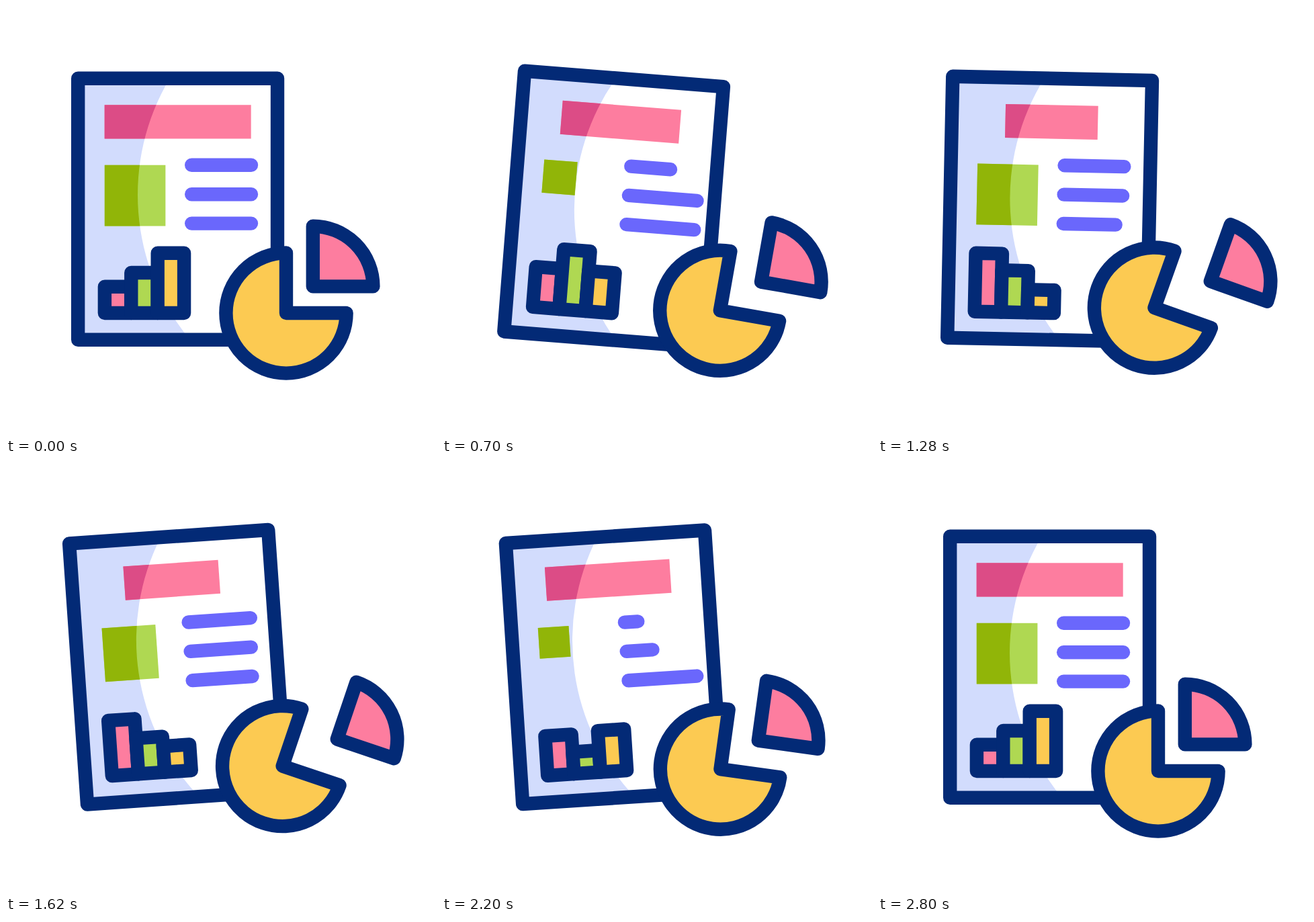
Animation, 640 px wide and 640 px high, one loop 2.82 s. Source, as an HTML page:

```html
<!DOCTYPE html>
<html lang="en">
<head>
<meta charset="utf-8">
<title>Report</title>
<style>
  html, body { margin: 0; width: 100%; height: 100%; overflow: hidden; background: #fff; }
  svg { display: block; width: 100vw; height: 100vh; }
  .ink { stroke: #032a76; stroke-width: 20.4; stroke-linejoin: round; }
  .line { stroke: #6a67fc; stroke-width: 20.4; stroke-linecap: round; }
</style>
</head>
<body>
<svg viewBox="0 0 640 640">
  <defs>
    <clipPath id="shade">
      <path d="M107 108H243.5A338.5 338.5 0 0 0 274 497H107Z"/>
    </clipPath>
  </defs>
  <g id="page">
    <rect x="107.2" y="107.8" width="296.8" height="389" fill="#fff"/>
    <g clip-path="url(#shade)">
      <rect x="107.2" y="107.8" width="296.8" height="389" fill="#d2dcfd"/>
    </g>
    <rect class="header" y="147.3" height="50.2" fill="#fd7d9f"/>
    <rect class="square" x="146.8" y="236.8" fill="#afd852"/>
    <g clip-path="url(#shade)">
      <rect class="header" y="147.3" height="50.2" fill="#dc4c86"/>
      <rect class="square" x="146.8" y="236.8" fill="#91b508"/>
    </g>
    <path class="line"/><path class="line"/><path class="line"/>
    <rect class="ink" x="107.2" y="107.8" width="296.8" height="389" fill="none"/>
    <rect class="ink bar" x="146.9" width="39.4" fill="#fd7d9f"/>
    <rect class="ink bar" x="186.3" width="39.4" fill="#afd852"/>
    <rect class="ink bar" x="225.7" width="39.4" fill="#fcca52"/>
  </g>
  <g id="chart">
    <path class="ink" fill="#fcca52" d="M417 457V367.4A89.6 89.6 0 1 0 506.6 457Z"/>
    <path id="slice" class="ink" fill="#fd7d9f" d="M456.8 417.4V327.8A89.6 89.6 0 0 1 546.4 417.4Z"/>
  </g>
</svg>
<script>
const LOOP = 2820, SPAN = 2800, HALF = SPAN / 2, QUARTER = SPAN / 4;
const all = selector => [...document.querySelectorAll(selector)];
const page = document.getElementById('page');
const chart = document.getElementById('chart');
const slice = document.getElementById('slice');
const headers = all('.header'), squares = all('.square');
const lines = all('.line'), bars = all('.bar');

const smooth = x => x * x * (3 - 2 * x);

// Linear start, eased end: cubic bezier (1/6, 1/6, 2/3, 1).
function settle(x) {
  const curve = (s, a, b) => 3 * a * (1 - s) ** 2 * s + 3 * b * (1 - s) * s * s + s ** 3;
  let low = 0, high = 1;
  for (let i = 0; i < 24; i++) {
    const mid = (low + high) / 2;
    if (curve(mid, 1 / 6, 2 / 3) < x) low = mid; else high = mid;
  }
  return curve(low, 1 / 6, 1);
}
const launch = x => 1 - settle(1 - x);

// Keys are [time, value, easing towards this key].
function track(time, keys) {
  if (time <= keys[0][0]) return keys[0][1];
  for (let i = 1; i < keys.length; i++) {
    const [t0, v0] = keys[i - 1], [t1, v1, ease = smooth] = keys[i];
    if (time < t1) return v0 + (v1 - v0) * ease((time - t0) / (t1 - t0));
  }
  return keys[keys.length - 1][1];
}

const tilt = [[0, 0], [905, 5, settle], [1800, -5], [SPAN, 0, launch]];
const swing = [[0, 0], [HALF, 1], [SPAN, 0]];
const squareSize = [[0, 90.6], [480, 66.5], [560, 66.5], [760, 45], [1270, 90.6]];
const lineLength = [[0, 88.8], [640, 102], [760, 18], [1240, 88.8]];
const barHeights = [
  [39.2, 60, 89.2, 60, 39.2],
  [60, 89.2, 60, 31, 60],
  [89.2, 60, 32, 60, 89.2]
].map(values => values.map((v, i) => [i * QUARTER, v]));

function draw(now) {
  const t = Math.min(now % LOOP, SPAN), u = t % HALF;
  const turn = track(t, swing);

  page.setAttribute('transform', `rotate(${track(t, tilt)} 255.6 302.3)`);
  chart.setAttribute('transform', `rotate(${20 * turn} 437 437)`);
  slice.setAttribute('transform', `translate(${26 * turn} ${-26 * turn})`);

  const width = 218 - 82 * turn;
  for (const header of headers) {
    header.setAttribute('x', 255.7 - width / 2);
    header.setAttribute('width', width);
  }
  const size = track(u, squareSize);
  for (const square of squares) {
    square.setAttribute('width', size);
    square.setAttribute('height', size);
  }
  lines.forEach((line, i) => {
    const length = track(u - 80 * i, lineLength);
    line.setAttribute('d', `M276.2 ${236.8 + 43.4 * i}h${length}`);
  });
  bars.forEach((bar, i) => {
    const height = track(t, barHeights[i]);
    bar.setAttribute('y', 457 - height);
    bar.setAttribute('height', height);
  });
}

const start = performance.now();
function tick() {
  draw(performance.now() - start);
  requestAnimationFrame(tick);
}
tick();
</script>
</body>
</html>
```
